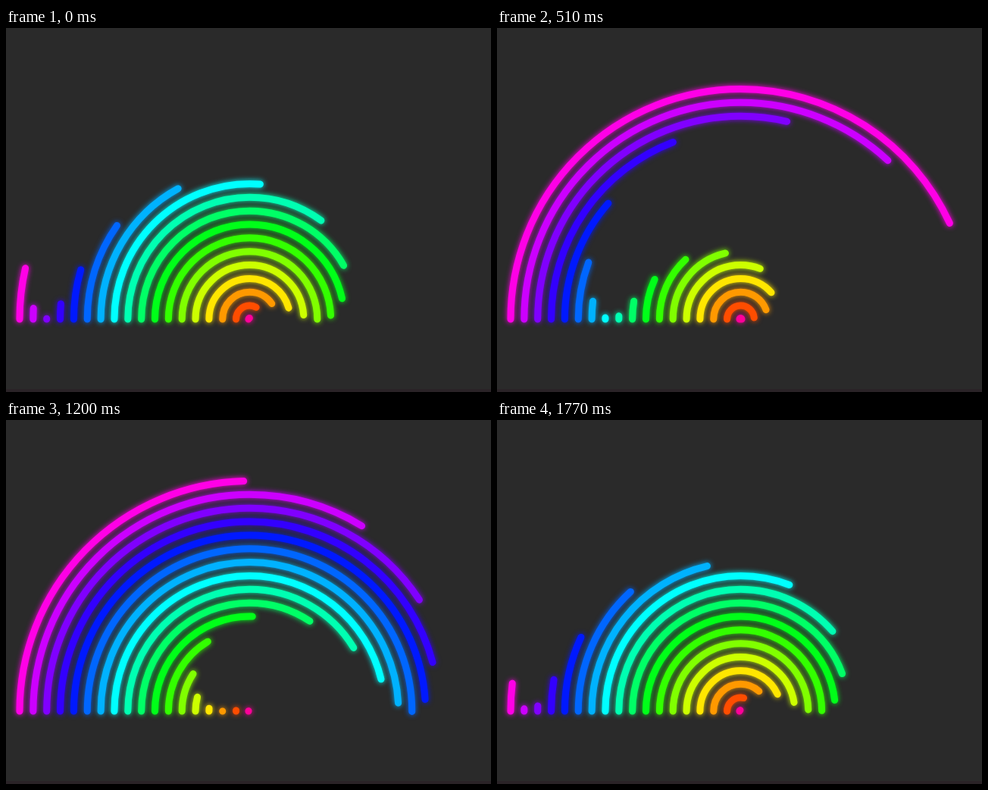
An HTML page with a canvas that plays this animation: 640 px wide and 480 px high, repeating every 1.8 s.

```html
<!DOCTYPE html>
<html lang="en">
<head>
<meta charset="utf-8">
<title>Rainbow arcs</title>
<style>
  html, body { margin: 0; width: 100%; height: 100%; overflow: hidden; background: #2a2a2a; }
  canvas { display: block; }
</style>
</head>
<body>
<canvas id="stage" width="640" height="480"></canvas>
<script>
const ctx = document.getElementById('stage').getContext('2d');
const LOOP = 1800, HALF = LOOP / 2, STEP = 30;
const COUNT = 18, STAGGER = 90, LEAD = 154;
const CX = 321.5, CY = 384, OUTER = 303.5, GAP = 17.85;

const easeInOut = x => x < 0.5 ? 2 * x * x : 1 - 2 * (1 - x) ** 2;

// Share of the half circle drawn by arc i, growing and shrinking in turn
function share(i, time) {
  const phase = (time + LEAD - i * STAGGER + 2 * LOOP) % LOOP;
  return easeInOut(phase < HALF ? phase / HALF : 2 - phase / HALF);
}

function drawArc(i, time) {
  const radius = Math.max(OUTER - i * GAP, 1.5);
  const hue = i < COUNT - 1 ? 18 * (COUNT - 1 - i) : 324;
  ctx.strokeStyle = ctx.shadowColor = `hsl(${hue}, 100%, 50%)`;
  ctx.beginPath();
  // A tiny extra angle keeps the round caps visible as a dot
  ctx.arc(CX, CY, radius, Math.PI, Math.PI * (1 + share(i, time)) + 0.002);
  ctx.stroke();
}

function draw(now) {
  // The picture advances in steps; the first pose is held for two of them
  const t = now % LOOP;
  const time = t < 2 * STEP ? STEP / 2 : Math.floor(t / STEP) * STEP;

  ctx.shadowBlur = 0;
  ctx.shadowColor = 'transparent';
  ctx.fillStyle = '#2a2a2a';
  ctx.fillRect(0, 0, 640, 480);
  ctx.fillStyle = '#2a2327';
  ctx.fillRect(0, 476, 640, 4);

  ctx.lineWidth = 9;
  ctx.lineCap = 'round';
  ctx.shadowBlur = 7;
  for (let i = 0; i < COUNT; i++) drawArc(i, time);
}

let start;
function tick(now) {
  start ??= now;
  draw(now - start);
  requestAnimationFrame(tick);
}
requestAnimationFrame(tick);
</script>
</body>
</html>
```
